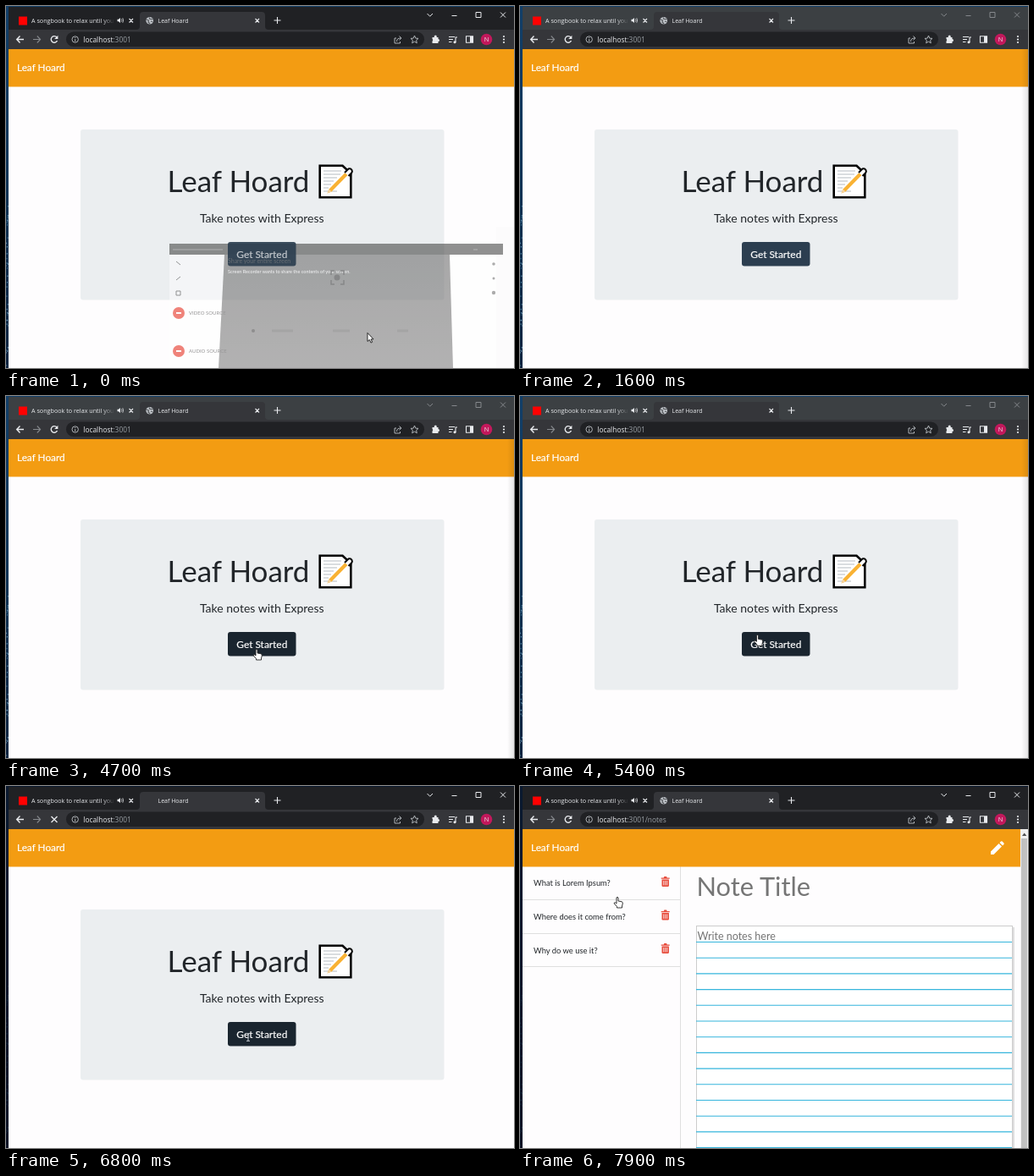
Write an HTML page that moves like this. It is 600x428 px and loops after 8000 ms.

```html
<!DOCTYPE html>
<html lang="en">
<head>
<meta charset="utf-8">
<title>Leaf Hoard</title>
<style>
html, body { margin: 0; width: 100%; height: 100%; overflow: hidden; background: #fff; }
svg { display: block; width: 100vw; height: 100vh; }
text { font-family: Lato, sans-serif; white-space: pre; }
.ui text { font-family: "Open Sans", "Noto Sans", sans-serif; fill: #e8eaed; }
.ln { fill: none; stroke: #e8eaed; stroke-width: 1.1; }
</style>
</head>
<body>
<svg viewBox="0 0 600 428">
  <defs>
    <linearGradient id="edge"><stop offset="0" stop-color="#000" stop-opacity="0"/><stop offset="1" stop-color="#000" stop-opacity=".1"/></linearGradient>
    <linearGradient id="desk" x2="0" y2="1"><stop offset="0" stop-color="#123f69"/><stop offset=".5" stop-color="#0b3355"/><stop offset="1" stop-color="#0a2440"/></linearGradient>
    <linearGradient id="panel" x2="0" y2="1"><stop offset="0" stop-color="#707070"/><stop offset="1" stop-color="#808080"/></linearGradient>
    <linearGradient id="clip"><stop offset="0" stop-color="currentColor" stop-opacity="0"/><stop offset="1" stop-color="currentColor"/></linearGradient>
    <g id="bin" fill="#e74c3c">
      <path d="M0 1.5H3L3.6 0H6.4L7 1.5H10V2.7H0Z"/>
      <path d="M.8 3.5H9.2V10.8Q9.2 12 8 12H2Q.8 12 .8 10.8Z"/>
      <path d="M3 5V10.4M5 5V10.4M7 5V10.4" stroke="#fff" stroke-width=".8"/>
    </g>
  </defs>

  <rect width="600" height="428" fill="#fefdfe"/>

  <g id="home">
    <rect x="88" y="146" width="429.5" height="201.5" rx="3" fill="#ebeef0"/>
    <text x="190.500" y="220" font-size="35" fill="#212529">Leaf Hoard</text>
    <g id="memo">
      <path d="M370.700 188.700H397.500L407.300 198V226.300H370.700Z" fill="#fff" stroke="#000" stroke-width="2.600"/>
      <path d="M375 195H396M375 199H395M375 203H391M375 207H387M375 211H384M375 215H381M375 219H391" stroke="#b6bcc2" stroke-width="1.2"/>
      <path d="M379.500 221.500L381.500 216.500L401.500 196L404.500 199L384.500 219.500Z" fill="#f9b233"/>
      <path d="M379.500 221.500L381.500 216.500L384.500 219.500Z" fill="#f3d3a2"/>
      <path d="M400 197L404.500 192.500Q407 191.500 408.500 194Q409.500 196 408 197.500L404.500 201" fill="#fff" stroke="#000" stroke-width="2"/>
    </g>
    <text x="302.300" y="256" font-size="14" text-anchor="middle" fill="#212529">Take notes with Express</text>
    <g id="fade">
      <rect x="193" y="281" width="394" height="147" fill="#fff" opacity=".75"/>
      <rect x="579" y="261" width="21" height="167" fill="#ddd" opacity=".12"/>
      <path d="M258 294H524L528 428H251Z" fill="url(#panel)"/>
      <rect x="193" y="281" width="394" height="13" fill="#484848"/>
      <path d="M197 288H256M552 288H557" stroke="#888"/>
      <text x="262" y="316" font-size="5.500" fill="#fff">Screen Recorder wants to share the contents of your screen.</text>
      <path d="M384 318V313H388M395 313H399V318M399 324V329H395M388 329H384V324" fill="none" stroke="#444" stroke-width="1.500"/>
      <circle cx="391" cy="321" r="3.500" fill="#444"/>
      <path d="M314 384H339M386 384H406M462 384H475" stroke="#6a6a6a" stroke-width="3"/>
      <circle cx="292" cy="384" r="2" fill="#444"/>
      <g fill="#e63323"><circle cx="204" cy="363" r="7"/><circle cx="204" cy="408" r="7"/></g>
      <path d="M201 363H207M201 408H207" stroke="#fff" stroke-width="2"/>
      <g font-size="6" fill="#555"><text x="216" y="365">VIDEO SOURCE</text><text x="216" y="410">AUDIO SOURCE</text></g>
      <path d="M201 302L206 306M201 324L206 320M201 337H206V342H201Z" fill="none" stroke="#555"/>
      <g fill="#777"><circle cx="576" cy="305" r="1.800"/><circle cx="576" cy="322" r="1.500"/><circle cx="576" cy="339" r="2.200"/></g>
    </g>
    <rect id="btn" x="262" y="279" width="80.500" height="28.500" rx="3"/>
    <text id="label" x="302.300" y="297.500" font-size="11.900" text-anchor="middle" fill="#fff" stroke="#fff" stroke-width=".2">Get Started</text>
    <text id="share" x="262" y="304" font-size="7" fill="#888">Share your entire screen</text>
  </g>

  <g id="notes">
    <path d="M3 134.500H189M3 174.500H189M3 213.500H189M189.500 95V428" stroke="#dfdfdf"/>
    <g font-size="9.400" fill="#212529">
      <text x="16" y="118">What is Lorem Ipsum?</text>
      <text x="16" y="158">Where does it come from?</text>
      <text x="16" y="197.500">Why do we use it?</text>
    </g>
    <use href="#bin" x="166.700" y="107"/><use href="#bin" x="166.700" y="146.500"/><use href="#bin" x="166.700" y="186"/>
    <g fill="#757575">
      <text x="208.500" y="130" font-size="30.800">Note Title</text>
      <rect x="209" y="167" width="375" height="270" fill="#000" opacity=".12"/>
      <rect x="208.500" y="165.500" width="373" height="270" fill="#fff" stroke="#ccc"/>
      <g id="rules" stroke="#35b5dc" stroke-width="1.100"></g>
      <text x="209.500" y="181.500" font-size="12.500">Write notes here</text>
    </g>
  </g>

  <rect x="3" y="51" width="597" height="44.500" fill="#f39c12"/>
  <text x="13" y="77" font-size="11.800" fill="#fff" stroke="#fff" stroke-width=".2">Leaf Hoard</text>
  <g id="side">
    <path d="M556 81V77.500L565.500 68L569 71.500L559.500 81ZM566.500 67L568 65.500Q568.800 65 569.600 65.500L571.500 67.500Q572 68.300 571.500 69L570 70.500Z" fill="#fff"/>
    <rect x="591" y="51" width="9" height="377" fill="#f1f1f1"/>
    <rect x="592" y="62" width="7" height="366" fill="#c1c1c1"/>
    <path d="M593 59L595.700 55.500L598.400 59Z" fill="#505050"/>
  </g>
  <rect id="shade" x="592" y="51" width="8" height="377" fill="url(#edge)"/>

  <g class="ui">
    <rect id="frame" width="600" height="29" fill="currentColor"/>
    <path d="M154 28Q158 28 158 24V11Q158 7 162 7H302Q306 7 306 11V24Q306 28 310 28Z" fill="#35363a"/>
    <rect y="28" width="600" height="23" fill="#35363a"/>
    <rect x="71" y="30.500" width="423" height="17.500" rx="8.750" fill="#202124"/>
    <rect x="15" y="12.500" width="10" height="10" fill="#f00"/>
    <text x="30" y="20" font-size="7.200">A songbook to relax until you</text>
    <rect x="114" y="10" width="14" height="14" fill="url(#clip)"/>
    <rect x="128" y="10" width="14" height="14" fill="currentColor"/>
    <path d="M131.500 15.800H133L135 14V20L133 18.200H131.500Z" fill="#e8eaed"/>
    <path d="M136.500 15.300Q137.500 17 136.500 18.700M137.800 14.200Q139.500 17 137.800 19.800" class="ln" style="stroke-width:.7"/>
    <g id="globe"><circle cx="169.700" cy="17.200" r="4.300" fill="#bdc1c6"/><path d="M166 16L168.500 17L168 19L170 21M169 13.500L170 15.500L173.500 15.500M171 18L173 18.500" fill="none" stroke="#55585c" stroke-width="1.200"/></g>
    <text x="179.500" y="20" font-size="7">Leaf Hoard</text>
    <path class="ln" d="M145.500 15L150 19.500M150 15L145.500 19.500M294.500 15L299 19.500M299 15L294.500 19.500M320.500 13V21M316.500 17H324.500"/>
    <path id="ctl" fill="none" d="M497.500 9L500.700 12.200L504 9M526.500 11.500H532.500M555 7.500H561V13.500H555ZM584 7.500L590 13.500M590 7.500L584 13.500"/>
    <path class="ln" d="M21 39.500H13M16.500 35.500L12.700 39.500L16.500 43.500" style="stroke-width:1.400"/>
    <path class="ln" d="M32 39.500H40M36.800 35.500L40.600 39.500L36.800 43.500" style="stroke:#85888c"/>
    <g id="reload"><path class="ln" d="M60 37A3.800 3.800 0 1 0 60.500 41" style="stroke-width:1.400"/><path d="M61.400 34.800V39H57.200Z" fill="#e8eaed"/></g>
    <path id="stop" class="ln" d="M53.500 36L60.500 43M60.500 36L53.500 43" style="stroke-width:1.400"/>
    <g fill="none" stroke="#bdc1c6" stroke-width=".9"><circle cx="81.700" cy="39.500" r="3.700"/><path d="M81.700 39V42M81.700 37V38"/>
      <path d="M461 38H459V44H465.500V42M461.500 42Q461.500 38 466 38M464.500 35.500L467 38L464.500 40.300"/>
      <path d="M482.500 35L483.800 38.100L487 38.400L484.600 40.600L485.300 43.800L482.500 42.100L479.700 43.800L480.400 40.600L478 38.400L481.200 38.100Z"/></g>
    <text x="91.300" y="42.500" font-size="8.400">localhost<tspan id="path" fill="#9aa0a6"></tspan></text>
    <path d="M503.500 37H506A1.500 1.500 0 1 1 508.500 37H510.500V39A1.500 1.500 0 1 1 510.500 42V44H503.500V41.500A1.500 1.500 0 0 0 503.500 39Z" fill="#e8eaed"/>
    <path class="ln" d="M523 36.500H530M523 39.500H528M523 42.500H526.500M531 43V37H533"/><circle cx="530" cy="42.800" r="1.500" fill="#e8eaed"/>
    <path class="ln" d="M543.500 35.700H551.500V43.300H543.500Z"/><rect x="548" y="36" width="3.500" height="7" fill="#e8eaed"/>
    <circle cx="567.500" cy="39.500" r="6.800" fill="#c2185b"/>
    <text x="567.500" y="42.200" font-size="7.500" text-anchor="middle">N</text>
    <g fill="#e8eaed"><circle cx="588" cy="36" r="1.100"/><circle cx="588" cy="39.500" r="1.100"/><circle cx="588" cy="43" r="1.100"/></g>
  </g>

  <path d="M0 0H600V1H3V428H0Z" fill="url(#desk)"/>
  <g id="specks"></g>
  <path id="dim" d="M0 0H600V1H3V428H0Z" fill="#070d1c" opacity=".75"/>

  <g id="cursor">
    <path id="arrow" d="M0 0V10L2.300 8L4 11.600L5.600 10.800L4 7.400H7Z" fill="#fff" stroke="#000" stroke-width=".8"/>
    <path id="hand" d="M-1 1Q0 -.5 1 1V5L5 5.700Q6.500 6 6.300 8L5.500 11V13H-.5V11.500L-3.800 8Q-4 6.500 -2.500 6.800L-1 8Z" fill="#fff" stroke="#222" stroke-width=".9"/>
    <path id="beam" d="M-2 -4.500H2M-2 4.500H2M0 -4.500V4.500" stroke="#b4bac0" stroke-width="1.200"/>
  </g>
</svg>
<script>
const $ = id => document.getElementById(id);
const set = (id, name, value) => $(id).setAttribute(name, value);
const show = (id, on) => set(id, "display", on ? "inline" : "none");

for (let i = 0; i < 14; i++) {
  const y = 184.5 + i * 18.7;
  $("rules").innerHTML += `<path d="M208 ${y}H581"/>`;
}
let seed = 7;
const rnd = () => (seed = seed * 16807 % 2147483647) / 2147483647;
for (let i = 0; i < 34; i++)
  $("specks").innerHTML += `<rect x="${rnd() * 2}" y="${225 + rnd() * 200}" width="1" height="1.5" fill="#8fb9d6" opacity="${.3 + rnd() * .6}"/>`;

// cursor stops: time, x, y
const stops = [
  [0, 427, 386.5], [100, 427, 386.5], [400, 606, 300],
  [3600, 606, 335], [4300, 296, 299], [5300, 296, 299],
  [5950, 52, 38], [6300, 52, 38], [6700, 286, 297],
  [7000, 286, 297], [7800, 115, 131], [8000, 115, 131]
];

function cursorAt(t) {
  const i = stops.findIndex(s => s[0] > t);
  const [t0, x0, y0] = stops[i - 1], [t1, x1, y1] = stops[i];
  const u = (t - t0) / (t1 - t0), k = u * u * (3 - 2 * u);
  return [x0 + (x1 - x0) * k, y0 + (y1 - y0) * k];
}

function draw(t) {
  const active = t < 300 || t >= 6300;
  const notes = t >= 7100;
  const loading = t >= 6400 && t < 7200;
  const fade = Math.max(0, 1 - t / 400);
  const [x, y] = cursorAt(t);
  const away = t >= 400 && t < 3600;
  const onBtn = !away && !notes && x > 262 && x < 342 && y > 279 && y < 308;
  const onItem = notes && x < 189 && y < 213;
  const beam = onBtn && loading;
  const hand = (onBtn && !beam) || onItem;

  show("home", !notes);
  show("notes", notes);
  show("side", notes);
  show("shade", !active);
  show("dim", t >= 6300);
  show("globe", !loading);
  show("reload", !loading);
  show("stop", loading);
  $("path").textContent = notes ? ":3001/notes" : ":3001";
  $("path").style.fill = "#9aa0a6";

  // the tab bar and its text fade share this colour
  document.body.style.color = active ? "#202124" : "#3c4043";
  set("ctl", "stroke", active ? "#e8eaed" : "#85888c");
  set("fade", "opacity", .6 * fade);
  set("share", "opacity", .6 * fade);
  set("label", "opacity", 1 - .3 * fade);
  set("btn", "opacity", 1 - .08 * fade);
  set("btn", "fill", onBtn ? "#1a252f" : "#2c3e50");

  show("cursor", !away);
  set("cursor", "transform", `translate(${x} ${y})`);
  show("hand", hand);
  show("beam", beam);
  show("arrow", !hand && !beam);
}

function tick(now) {
  draw(Math.floor(now % 8000 / 100) * 100);
  requestAnimationFrame(tick);
}
draw(0);
requestAnimationFrame(tick);
</script>
</body>
</html>
```
